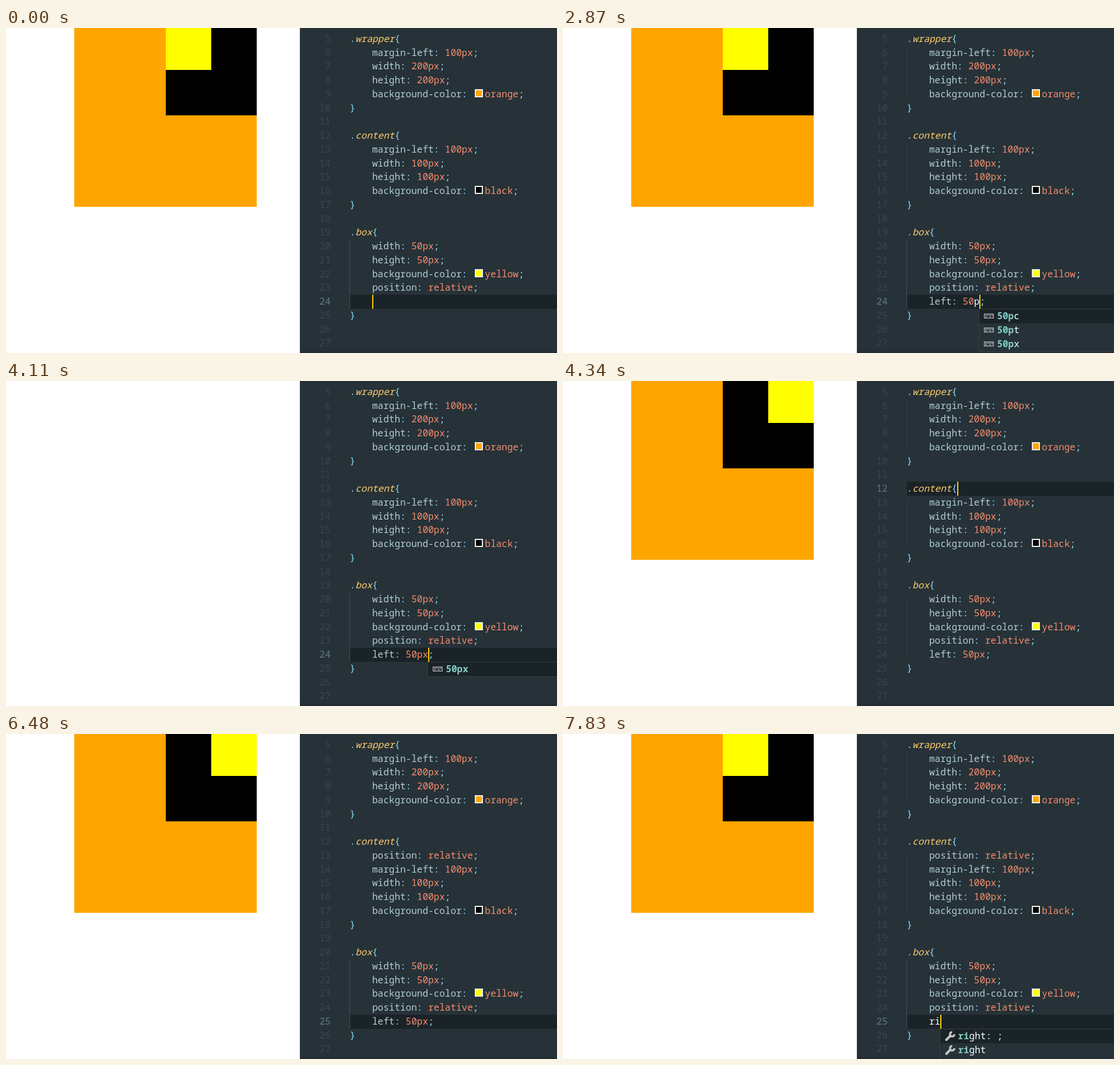
Recreate the animation shown at these times as an HTML page with a canvas. Size 945 px wide and 558 px high, loop 8000 ms.

```html
<!DOCTYPE html>
<html lang="en">
<head>
<meta charset="utf-8">
<title>Relative positioning</title>
<style>
  html, body { margin: 0; width: 100%; height: 100%; overflow: hidden; background: #fff; }
  canvas { display: block; }
</style>
</head>
<body>
<canvas id="stage" width="945" height="558"></canvas>
<script>
const ctx = document.getElementById('stage').getContext('2d');
const LOOP = 8000, CHAR = 9.6, ROW = 23.75, FIRST = 5, LAST = 27;
const CODE_X = 589.6, EDGE = 945;
const FONT = '16px "Noto Sans Mono", "DejaVu Sans Mono", monospace';
const color = {
  back: '#263238', current: '#1a2327', number: '#37474f', numberOn: '#607a86',
  guide: '#2d3b42', guideOn: '#41515a', plain: '#eeffff', prop: '#b2ccd6',
  punct: '#89ddff', value: '#f78c6c', name: '#ffcb6b', caret: '#ffcc00',
  match: '#80cbc4', border: '#343f45', icon: '#c5c5c5', error: '#e0505f'
};

// Each step changes part of the editor state from its time on.
const steps = [
  [0, { line: 24, col: 4, caret: true, left: '', page: 'start' }],
  [160, { caret: false }],
  [530, { left: 'l', col: 5, caret: true }],
  [690, { left: 'le', col: 6, hints: ['left: ;', 'left', ''], match: 2, icon: wrench }],
  [920, { left: 'left: ;', col: 10, hints: null }],
  [1390, { caret: false }],
  [1620, { error: true }],
  [1940, { caret: true }],
  [2090, { left: 'left: 5;', col: 11, error: false }],
  [2490, { left: 'left: 50;', col: 12 }],
  [2870, { left: 'left: 50p;', col: 13, hints: ['50pc', '50pt', '50px'], match: 3, icon: ruler }],
  [3050, { left: 'left: 50px;', col: 14, hints: ['50px'], match: 4 }],
  [3570, { caret: false }],
  [4050, { caret: true }],
  [4110, { page: 'blank' }],
  [4200, { page: 'moved', hints: null }],
  [4340, { line: 12, col: 9 }],
  [4420, { line: 13, col: 4, position: '' }],
  [4960, { caret: false }],
  [5180, { position: 'position: relative;', col: 23, caret: true }],
  [5640, { caret: false }],
  [6130, { caret: true }],
  [6270, { line: 25, col: 15 }],
  [6480, { caret: false }],
  [6720, { left: '', col: 4, caret: true }],
  [6790, { brackets: true }],
  [7240, { brackets: false, caret: false, page: 'start' }],
  [7510, { caret: true }],
  [7690, { left: 'r', col: 5 }],
  [7760, { left: 'ri', col: 6 }],
  [7830, { hints: ['right: ;', 'right', ''], match: 2, icon: wrench }]
];

const stateAt = t => Object.assign({}, ...steps.filter(s => s[0] <= t).map(s => s[1]));
const rowTop = line => Math.round(6.75 + (line - FIRST) * ROW);
const colX = col => CODE_X + col * CHAR;

function rect(x, y, w, h, fill) {
  ctx.fillStyle = fill;
  ctx.fillRect(x, y, w, h);
}

function text(str, x, y, fill, style = '') {
  ctx.font = style + ' ' + FONT;
  ctx.fillStyle = fill;
  ctx.fillText(str, x, y);
  return x + str.length * CHAR;
}

function drawPage(page) {
  rect(0, 0, 504, 558, '#fff');
  if (page === 'blank') return;
  rect(117, 0, 313, 307, '#ffa500');
  rect(274, 0, 156, 150, '#000');
  rect(page === 'moved' ? 352 : 274, 0, 78, 72, '#ff0');
}

function buildRules(s) {
  const sized = (size, paint) => [`width: ${size}px;`, `height: ${size}px;`, `background-color: ${paint};`];
  const margin = 'margin-left: 100px;';
  const extra = s.position === undefined ? [] : [s.position];
  return [
    ['wrapper', margin, ...sized(200, 'orange')],
    ['content', ...extra, margin, ...sized(100, 'black')],
    ['box', ...sized(50, 'yellow'), 'position: relative;', s.left]
  ];
}

function drawDeclaration(str, top) {
  const x = colX(4), y = top + 17;
  const parts = str.match(/^([\w-]+)(: )(.*);$/);
  if (!parts) return text(str, x, y, color.plain);
  const [, prop, colon, value] = parts;
  let end = text(colon, text(prop, x, y, color.prop), y, color.punct);
  if (prop === 'background-color') {
    rect(804, top + 3, 14, 14, '#eee');
    rect(806, top + 5, 10, 10, value);
    end = 821.3;
  }
  const partial = /^\d+p$/.test(value);
  end = text(partial ? value.slice(0, -1) : value, end, y, color.value);
  if (partial) end = text('p', end, y, color.plain);
  text(';', end, y, color.punct);
}

function drawBracketBox(col, line) {
  ctx.strokeStyle = 'rgba(255,204,0,.35)';
  ctx.lineWidth = 1;
  ctx.strokeRect(Math.round(colX(col)) - .5, rowTop(line) + .5, 9, 21);
}

function drawRule([name, ...body], line, s) {
  const y = rowTop(line) + 17, end = line + body.length + 1;
  const nameEnd = text(name, text('.', CODE_X, y, color.punct), y, color.name, 'italic');
  text('{', nameEnd, y, color.punct);
  body.forEach((str, i) => drawDeclaration(str, rowTop(line + 1 + i)));
  text('}', CODE_X, rowTop(end) + 17, color.punct);
  const active = s.line > line && s.line < end;
  rect(589, rowTop(line + 1), 1, rowTop(end) - rowTop(line + 1), active ? color.guideOn : color.guide);
  if (s.brackets && active) {
    drawBracketBox(name.length + 1, line);
    drawBracketBox(0, end);
  }
  return end + 2;
}

function ruler(x, y) {
  ctx.strokeStyle = color.icon;
  ctx.lineWidth = 1.2;
  ctx.strokeRect(x + .6, y - 4, 15.6, 7);
  for (let i = 0; i < 4; i++) rect(x + 3 + i * 3.4, y - 3, 1.2, i % 2 ? 3 : 5, color.icon);
}

function wrench(x, y) {
  ctx.strokeStyle = color.icon;
  ctx.lineWidth = 4;
  ctx.lineCap = 'round';
  ctx.beginPath();
  ctx.moveTo(x + 2.5, y + 6);
  ctx.lineTo(x + 9, y - .5);
  ctx.stroke();
  ctx.lineCap = 'butt';
  ctx.lineWidth = 3.4;
  ctx.beginPath();
  ctx.arc(x + 12.5, y - 3.5, 3.8, 0, Math.PI * 1.5);
  ctx.stroke();
}

function drawHints(s) {
  const x = Math.round(colX(s.col)) - 1, top = rowTop(s.line + 1);
  const height = s.hints.length * 24;
  rect(x, top, EDGE - x, height + 2, color.border);
  rect(x + 1, top + 1, EDGE - x, height, color.back);
  rect(x + 1, top + 1, EDGE - x, 24, color.current);
  s.hints.forEach((str, i) => {
    const y = top + 1 + i * 24;
    s.icon(x + 9, y + 12);
    const end = text(str.slice(0, s.match), x + 31.4, y + 17, color.match, 'bold');
    text(str.slice(s.match), end, y + 17, color.plain, i ? '' : '500');
  });
}

function drawSquiggle(x, y) {
  ctx.strokeStyle = color.error;
  ctx.lineWidth = 1;
  ctx.beginPath();
  for (let i = 0; i <= 9; i++) ctx.lineTo(x + i, y + 1.5 * Math.cos(i * Math.PI / 3));
  ctx.stroke();
}

function drawEditor(s) {
  rect(504, 0, 441, 558, color.back);
  const top = rowTop(s.line);
  rect(590, top, EDGE - 590, rowTop(s.line + 1) - top, color.current);
  for (let n = FIRST; n <= LAST; n++) {
    const x = 556.8 - String(n).length * CHAR;
    text(String(n), x, rowTop(n) + 17, n === s.line ? color.numberOn : color.number);
  }
  buildRules(s).reduce((line, rule) => drawRule(rule, line, s), FIRST);
  if (s.error) drawSquiggle(685.5, top + 22);
  if (s.caret) rect(Math.round(colX(s.col)), top, 2, 24, color.caret);
  const shade = ctx.createLinearGradient(0, 551, 0, 558);
  shade.addColorStop(0, 'rgba(0,0,0,0)');
  shade.addColorStop(1, 'rgba(0,0,0,.12)');
  rect(504, 551, 441, 7, shade);
  if (s.hints) drawHints(s);
}

function draw() {
  const s = stateAt(performance.now() % LOOP);
  drawPage(s.page);
  drawEditor(s);
  requestAnimationFrame(draw);
}
draw();
</script>
</body>
</html>
```
